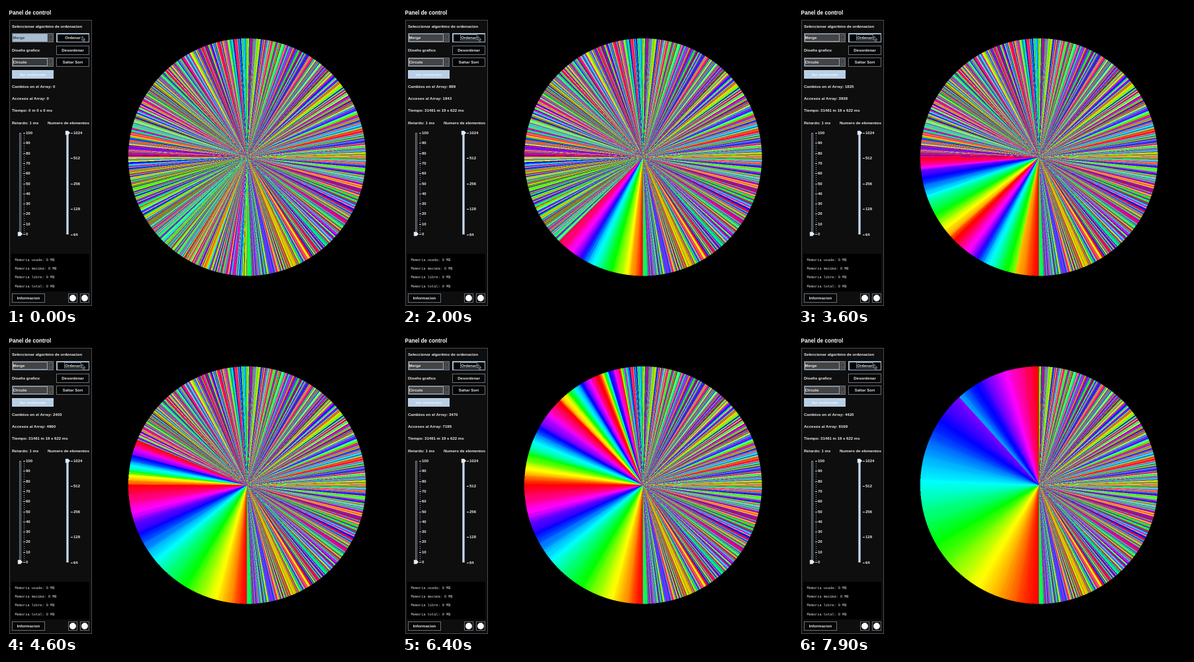
Write an HTML page with a canvas that moves like this. It is 590 by 454 pixels and loops after 8 s.

```html
<!DOCTYPE html>
<html lang="es">
<head>
<meta charset="utf-8">
<title>Panel de control</title>
<style>
html, body { margin: 0; width: 100%; height: 100%; overflow: hidden; background: #000; }
#stage { position: relative; width: 590px; height: 454px; overflow: hidden; }
canvas { position: absolute; left: 184px; top: 49px; width: 362px; height: 361px; }
svg { position: absolute; left: 0; top: 0; }
text { font: bold 6.05px "Liberation Sans", Arial, sans-serif; fill: #e8e8e8; white-space: pre; }
text.title { font-size: 8.2px; fill: #fff; }
text.mono { font: 5.25px "Liberation Mono", "Courier New", monospace; fill: #e0e0e0; }
text.mid { text-anchor: middle; }
rect, line { shape-rendering: crispEdges; }
</style>
</head>
<body>
<div id="stage">
  <canvas id="wheel" width="724" height="722"></canvas>
  <svg id="panel" width="590" height="454" viewBox="0 0 590 454"></svg>
</div>
<script>
const LOOP = 8000, STEP = 100, START = 500, COUNT = 1024;
const panel = document.getElementById('panel');

// ---- control panel ----
function add(tag, attrs, content) {
  const el = document.createElementNS('http://www.w3.org/2000/svg', tag);
  for (const key in attrs) el.setAttribute(key, attrs[key]);
  if (content !== undefined) el.textContent = content;
  panel.appendChild(el);
  return el;
}
const label = (x, y, content, cls = '') => add('text', { x, y, class: cls }, content);
const box = (x, y, width, height, fill, stroke = 'none', weight = 1) =>
  add('rect', { x, y, width, height, fill, stroke, 'stroke-width': weight });
const tick = (x1, x2, y, stroke) => add('line', { x1, x2, y1: y, y2: y, stroke });

function button(x, y, content, width = 49) {
  box(x + .5, y + .5, width, 13, '#050505', '#66707c');
  label(x + width / 2 + .5, y + 9.2, content, 'mid');
}
function combo(y, content) {
  box(9.5, y + .5, 62, 13, '#353535', '#66707c');
  const field = box(10.5, y + 1.5, 52, 11, '#444', '#9aabbc');
  box(64, y + 1, 7, 12, '#4a4a4a');
  add('path', { d: `M66 ${y + 5.5}h3l-1.5 2z`, fill: '#222' });
  const value = label(10.5, y + 9.2, content);
  return { field, value };
}
function thumb(x, y) {
  add('path', { d: `M${x - 3} ${y - 3}h4l3 3l-3 3h-4z`, fill: '#e6edf4', stroke: '#9fb2c6', 'stroke-width': .5 });
}

label(4.5, 13, 'Panel de control', 'title');
box(5.5, 21.5, 124, 432, '#0e0e0e', '#4c4c4c');
label(9, 32.7, 'Seleccionar algoritmo de ordenacion');
const algorithm = combo(41, 'Merge');
label(9, 68.5, 'Diseño grafico');
const design = combo(78, 'Circulo');
button(76, 41, 'Ordenar');
box(76.75, 41.75, 48.5, 12.5, 'none', '#a3b8cc', 1.5);
const focusRing = box(88.5, 43.5, 25, 8, 'none', '#66788a');
button(76, 60, 'Desordenar');
button(76, 78, 'Saltar Sort');
box(9, 97, 63, 13, '#b8cfe5');
label(40.5, 105.7, 'Ver multicolor', 'mid').style.fill = '#eef3f8';

const changes = label(9, 123.8, '');
const accesses = label(9, 142, '');
const elapsed = label(9, 160.4, '');
label(9, 178.7, 'Retardo: 1 ms');
label(63, 178.7, 'Numero de elementos');

box(20.5, 192.5, 2, 153, '#161616', '#7c8794');
for (let v = 0; v <= 100; v += 2) {
  const y = Math.round(345 - v * 1.53) + .5;
  if (v % 10) tick(27, 28, y, '#aaa');
  else {
    tick(26, 29, y, '#ddd');
    label(30, y + 1.7, v);
  }
}
thumb(21, 345);
box(91.5, 191.5, 3, 154, '#c9d9e8', '#7f93a8');
[1024, 512, 256, 128, 64].forEach((v, i) => {
  const y = Math.round(192 + i * 38.4) + .5;
  tick(98, 101, y, '#ddd');
  label(102, y + 1.7, v);
});
thumb(93, 192);

box(8, 375, 118, 57, '#000');
['usada: 0 MB', 'maxima: 0 MB', 'libre: 0 MB', 'total: 0 MB'].forEach((content, i) =>
  label(13.5, 385.5 + i * 13.4, 'Memoria ' + content, 'mono'));
button(9, 435, 'Informacion');
for (const x of [94, 112]) {
  box(x + .5, 435.5, 13, 13, '#050505', '#66707c');
  add('circle', { cx: x + 7, cy: 442, r: 5, fill: '#fff' });
}
add('path', { d: 'M115 46v6.4l1.5-1.3l1.1 2.3l1.1-.5l-1.1-2.3h2z', fill: '#111', stroke: '#ddd', 'stroke-width': .6 });

// ---- merge sort, recorded as a list of writes ----
let seed = 20177;
function random() {
  seed = (Math.imul(seed, 1664525) + 1013904223) >>> 0;
  return seed / 4294967296;
}
const shuffled = Array.from({ length: COUNT }, (_, i) => i);
function swap(i, j) {
  [shuffled[i], shuffled[j]] = [shuffled[j], shuffled[i]];
}
// every slot swaps with any other, which leaves values drifting near their old places
for (let i = 0; i < COUNT; i++) swap(i, Math.floor(random() * COUNT));
// a narrow green wedge closes the circle
for (let k = 0; k < 6; k++) swap(COUNT - 6 + k, shuffled.indexOf(370 + k * 11));

const writes = [];
function mergeSort(list, from, to) {
  if (to - from < 2) return;
  const mid = (from + to) >> 1;
  mergeSort(list, from, mid);
  mergeSort(list, mid, to);
  const left = list.slice(from, mid), right = list.slice(mid, to);
  for (let k = from, i = 0, j = 0; k < to; k++) {
    const takeLeft = j >= right.length || (i < left.length && left[i] <= right[j]);
    list[k] = takeLeft ? left[i++] : right[j++];
    writes.push([k, list[k]]);
  }
}
mergeSort(shuffled.slice(), 0, COUNT);

// time, writes drawn, changes counted, accesses counted
const progress = [
  [0, 0, 0, 0],
  [START, 0, 0, 0],
  [1300, 473, 473, 963],
  [2800, 1365, 1365, 2849],
  [3600, 1825, 1825, 3938],
  [4600, 2436, 2403, 4960],
  [6400, 3520, 3470, 7195],
  [7900, 4488, 4420, 9169]
];
function progressAt(t) {
  let i = 1;
  while (i < progress.length - 1 && t > progress[i][0]) i++;
  const a = progress[i - 1], b = progress[i];
  const f = (t - a[0]) / (b[0] - a[0]);
  return a.map((v, k) => Math.round(v + (b[k] - v) * f));
}

// ---- colour wheel at double density: each pixel belongs to one element, clockwise from the bottom ----
const canvas = document.getElementById('wheel');
const ctx = canvas.getContext('2d');
const image = ctx.createImageData(canvas.width, canvas.height);
const pixels = new Uint32Array(image.data.buffer);
const CX = 361.4, CY = 359.4, RADIUS = 359.4;
const owner = new Int16Array(pixels.length).fill(-1);
for (let p = 0; p < owner.length; p++) {
  const dx = p % canvas.width + .5 - CX;
  const dy = Math.floor(p / canvas.width) + .5 - CY;
  if (Math.hypot(dx, dy) > RADIUS) continue;
  const turn = Math.atan2(-dx, dy) / (2 * Math.PI);
  owner[p] = Math.floor((turn + 1) % 1 * COUNT);
}
const palette = Array.from({ length: COUNT }, (_, v) => {
  const channel = offset => {
    const k = (offset + v / COUNT * 6) % 6;
    return Math.round(255 * (1 - Math.max(0, Math.min(k, 4 - k, 1))));
  };
  return (255 << 24 | channel(1) << 16 | channel(3) << 8 | channel(5)) >>> 0;
});

function drawWheel(done) {
  const list = shuffled.slice();
  for (let i = 0; i < done; i++) list[writes[i][0]] = writes[i][1];
  for (let p = 0; p < owner.length; p++) {
    if (owner[p] >= 0) pixels[p] = palette[list[owner[p]]];
  }
  ctx.putImageData(image, 0, 0);
}

function render(t) {
  const [, done, changed, accessed] = progressAt(t);
  const running = t >= START;
  drawWheel(done);
  changes.textContent = 'Cambios en el Array: ' + changed;
  accesses.textContent = 'Accesos al Array: ' + accessed;
  elapsed.textContent = 'Tiempo: ' + (running ? '31461 m 19 s 622 ms' : '0 m 0 s 0 ms');
  algorithm.field.setAttribute('fill', running ? '#444' : '#a9bdd1');
  algorithm.value.style.fill = running ? '#e8e8e8' : '#3c4650';
  design.field.setAttribute('fill', running ? '#444' : '#383838');
  focusRing.setAttribute('visibility', running ? 'visible' : 'hidden');
}

const origin = performance.now();
let shown = -1;
function frame() {
  const t = Math.floor(Math.max(0, performance.now() - origin) % LOOP / STEP) * STEP;
  if (t !== shown) render(shown = t);
  requestAnimationFrame(frame);
}
frame();
</script>
</body>
</html>
```
